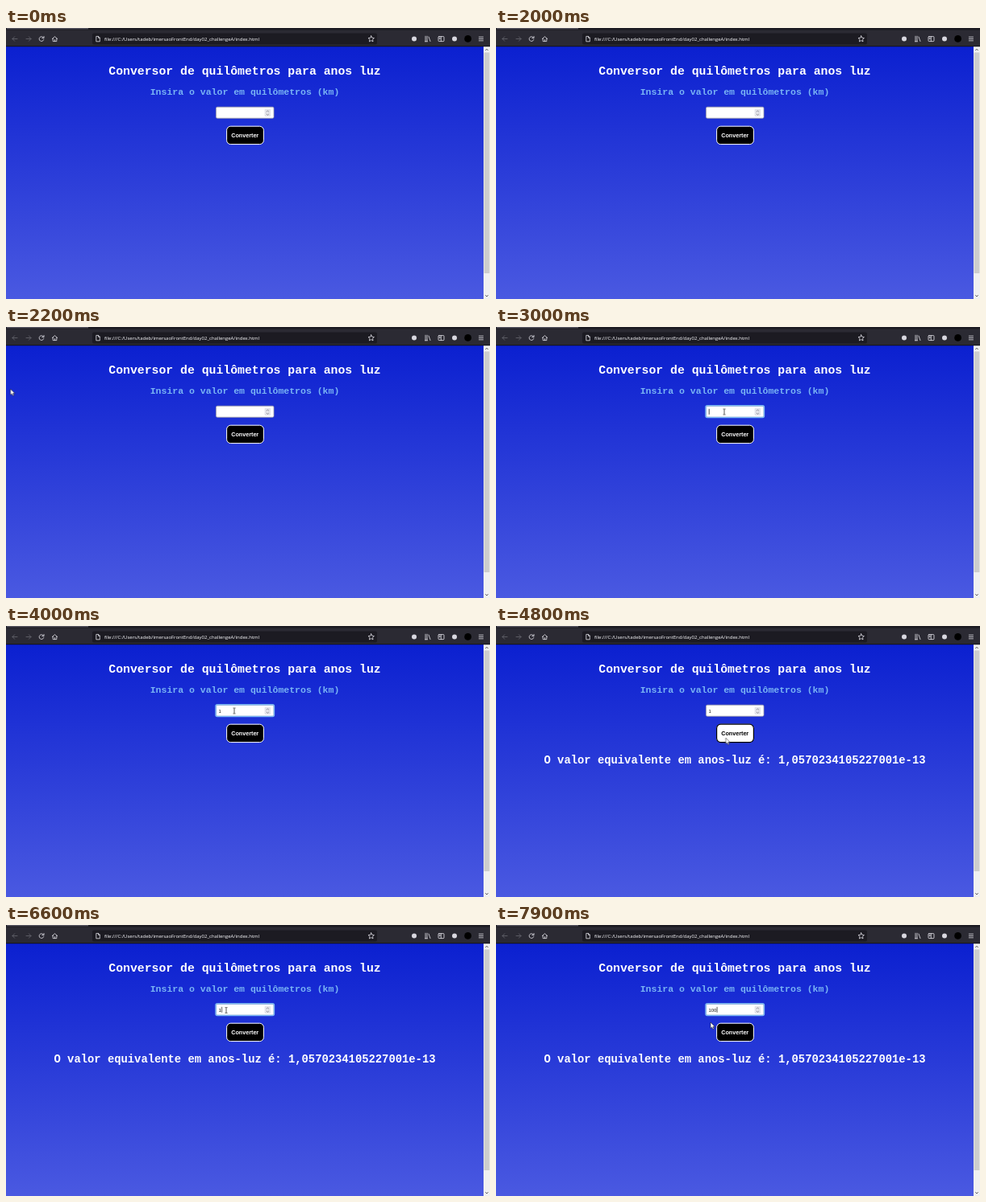
Write an HTML page that moves like this. It is 600 px wide and 337 px high and loops after 8 s.

```html
<!DOCTYPE html>
<html lang="pt">
<head>
<meta charset="utf-8">
<title>Conversor</title>
<style>
html, body { margin: 0; width: 100%; height: 100%; overflow: hidden; background: #000; }
svg { display: block; width: 100vw; height: 100vh; }
text { white-space: pre; }

.mono { font-family: "Liberation Mono", "Courier New", monospace; font-weight: bold; text-anchor: middle; fill: #fff; }
.sans { font-family: "Liberation Sans", Arial, sans-serif; }
.url { font: 5.97px "Open Sans", "Noto Sans", sans-serif; fill: #fbfbfe; }
.icon { fill: none; stroke: #e4e3ea; stroke-width: .8; stroke-linecap: round; stroke-linejoin: round; }
.dim { stroke: #686770; }

/* Every part shares one 8 s clock; states switch hard. */
.t { animation: 8s step-end infinite; }
.black { animation-name: black; }
.focus { animation-name: focus; }
.one { animation-name: one; }
.zero1 { animation-name: zero1; }
.zero2 { animation-name: zero2; }
.caret { animation-name: caret; }
.hover { animation-name: hover; }
.result { animation-name: result; }
.arrow { animation-name: arrow; }
.beam { animation-name: beam; }
.mouse { animation: mouse 8s ease-in-out infinite; }

@keyframes black { 0%, 27.5% { opacity: 0 } 26.25% { opacity: 1 } 100% { opacity: 0 } }
@keyframes focus { 0%, 58.75% { opacity: 0 } 35%, 78.75% { opacity: 1 } 100% { opacity: 1 } }
@keyframes one { 0% { opacity: 0 } 42.5%, 100% { opacity: 1 } }
@keyframes zero1 { 0% { opacity: 0 } 91.25%, 100% { opacity: 1 } }
@keyframes zero2 { 0% { opacity: 0 } 95%, 100% { opacity: 1 } }
@keyframes result { 0% { opacity: 0 } 58.75%, 100% { opacity: 1 } }
@keyframes hover { 0%, 74.4%, 100% { opacity: 0 } 53.4% { opacity: 1 } }
@keyframes arrow { 0%, 32.5%, 75.6% { opacity: 0 } 27.5%, 52.4%, 85.7%, 100% { opacity: 1 } }
@keyframes beam { 0%, 52.4%, 85.7%, 100% { opacity: 0 } 32.5%, 75.6% { opacity: 1 } }
@keyframes caret {
  0%, 41.25% { opacity: 0; transform: none }
  35% { opacity: 1; transform: none }
  42.5%, 55%, 78.75% { opacity: 1; transform: translateX(3.25px) }
  48.75%, 58.75%, 85% { opacity: 0; transform: translateX(3.25px) }
  91.25% { opacity: 1; transform: translateX(6.5px) }
  95%, 100% { opacity: 1; transform: translateX(9.75px) }
}
@keyframes mouse {
  0%, 27.5% { transform: translate(5.5px, 77px) }
  33.75%, 50.625% { transform: translate(283px, 105.5px) }
  56.25% { transform: translate(285px, 141px) }
  62.5%, 71.25% { transform: translate(284.7px, 138.3px) }
  77.5%, 83.125% { transform: translate(273px, 106px) }
  87.5%, 91.25% { transform: translate(253px, 105px) }
  98.75%, 100% { transform: translate(266px, 121px) }
}
</style>
</head>
<body>
<svg viewBox="0 0 600 337" preserveAspectRatio="none">
  <defs>
    <linearGradient id="sky" x2="0" y2="1">
      <stop stop-color="#0b20d0"/>
      <stop offset="1" stop-color="#4a59e1"/>
    </linearGradient>
  </defs>

  <!-- page -->
  <rect y="23" width="592" height="314" fill="url(#sky)"/>
  <text class="mono" x="296" y="58.3" font-size="14.8">Conversor de quilômetros para anos luz</text>
  <text class="mono" x="296" y="82.5" font-size="11.5" style="fill:#79b4f4">Insira o valor em quilômetros (km)</text>
  <text class="mono t result" x="296" y="170.5" font-size="13.83">O valor equivalente em anos-luz é: 1,0570234105227001e-13</text>

  <!-- number field -->
  <rect x="260.4" y="98.2" width="71.6" height="14" rx="1.6" fill="#fff" stroke="#9a9aa8" stroke-width=".8"/>
  <rect class="t focus" x="260" y="97.8" width="72.4" height="14.8" rx="2" fill="none" stroke="#7db9f5" stroke-width="1.5"/>
  <rect x="320.6" y="101" width="7.6" height="9" rx=".8" fill="#e4e4ea"/>
  <path d="M322.8 104.4l1.6-1.6 1.6 1.6M322.8 106.8l1.6 1.6 1.6-1.6" fill="none" stroke="#70707c" stroke-width=".7"/>
  <g class="sans" font-size="5.85" fill="#111">
    <text class="t one" x="263.6" y="107.6">1</text>
    <text class="t zero1" x="266.85" y="107.6">0</text>
    <text class="t zero2" x="270.1" y="107.6">0</text>
  </g>
  <rect class="t caret" x="263.8" y="101.8" width=".7" height="7" fill="#000"/>

  <!-- button -->
  <g class="sans" font-size="7.2" font-weight="bold" text-anchor="middle">
    <rect x="273.6" y="122.2" width="45.8" height="22.4" rx="5" fill="#000" stroke="#fff"/>
    <text x="296.2" y="135.8" fill="#fff">Converter</text>
    <g class="t hover">
      <rect x="273.6" y="122.2" width="45.8" height="22.4" rx="5" fill="#fff" stroke="#000" stroke-width="1.2"/>
      <text x="296.2" y="135.8" fill="#000">Converter</text>
    </g>
  </g>

  <!-- scrollbar -->
  <rect x="592" y="23" width="8" height="314" fill="#f0f0f0"/>
  <rect x="592.6" y="30.5" width="6.8" height="274.5" fill="#cdcdcd"/>
  <path d="M594.3 28l1.7-1.8 1.7 1.8M594.3 332.2l1.7 1.8 1.7-1.8" fill="none" stroke="#505050" stroke-width=".9"/>

  <!-- browser bar -->
  <rect width="600" height="23" fill="#2b2a33"/>
  <rect width="600" height="2.6" fill="#1c1b22"/>
  <rect x="1" width="101" height="1.4" fill="#55545f"/>
  <rect y="22.4" width="600" height=".8" fill="#0d0c14"/>
  <rect x="107" y="6.5" width="353" height="14" rx="2" fill="#1c1b22"/>
  <text class="url" x="122" y="15.9">file:///C:/Users/tadeb/imersaoFrontEnd/day02_challengeA/index.html</text>
  <g class="icon">
    <path class="dim" d="M14 13.5H8m2.6-2.7L8 13.5l2.6 2.7M25 13.5h6m-2.6-2.7l2.6 2.7-2.6 2.7"/>
    <path d="M46.6 12.2a2.9 2.9 0 1 0 .2 2.3M47 10.4v2.2h-2.2"/>
    <path d="M57.3 13.6l3.2-3 3.2 3M58.2 13v3.6h4.6V13M60.5 16.4v-1.8"/>
    <path d="M112.2 10.4h2.4l1.7 1.7v4.7h-4.1zM114.5 10.5v1.8h1.7"/>
    <path d="M452.7 9.8l1.1 2.4 2.6.3-1.9 1.8.5 2.6-2.3-1.3-2.3 1.3.5-2.6-1.9-1.8 2.6-.3z"/>
    <path d="M520 10.2v6.4M522 10.2v6.4M524 11l2 5.6M519.4 16.8h3"/>
    <rect x="536" y="10.6" width="7" height="6" rx=".8"/>
    <path d="M539.3 10.6v6M537.2 12.2h1M537.2 13.6h1"/>
    <path d="M586.3 11.2h5.2M586.3 13.5h5.2M586.3 15.8h5.2"/>
  </g>
  <circle cx="506" cy="13.5" r="3" fill="#d8d7df"/>
  <circle cx="556" cy="13.5" r="3" fill="#d8d7df"/>
  <circle cx="572.6" cy="13.4" r="4.4" fill="#000"/>

  <!-- pointer -->
  <g class="mouse">
    <path class="t arrow" d="M0 0v7.4l1.7-1.5 1.2 2.7 1.3-.6-1.2-2.6h2.3z" fill="#fff" stroke="#111" stroke-width=".5"/>
    <path class="t beam" d="M-1.5-3.4h1.1l.4.4.4-.4h1.1M0-3v6M-1.5 3.4h1.1L0 3l.4.4h1.1" fill="none" stroke="#111" stroke-width=".7"/>
  </g>

  <rect class="t black" width="600" height="337" fill="#000"/>
</svg>
</body>
</html>
```
